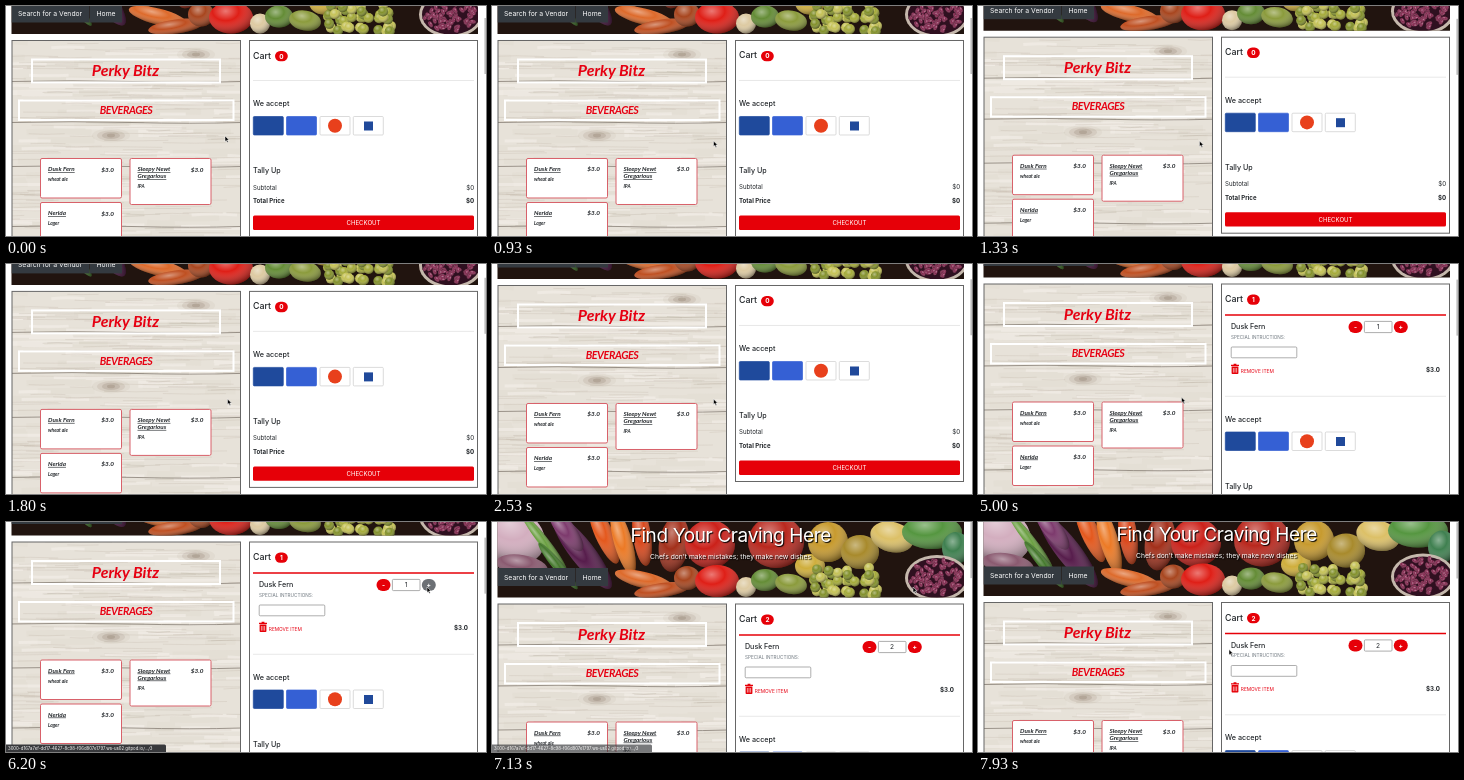
An HTML page for the animation above (8000 ms loop, 480 px wide and 230 px high).

```html
<!DOCTYPE html>
<html lang="en">
<head>
<meta charset="utf-8">
<title>Vendor menu and cart</title>
<style>
html, body { margin: 0; width: 100%; height: 100%; overflow: hidden; background: #fff; }
svg { display: block; width: 100vw; height: 100vh; }
text { font-family: Inter, Roboto, sans-serif; fill: #212529; white-space: pre; }
.medium { font-weight: 500; }
.bold { font-weight: 700; }
.middle { text-anchor: middle; }
.end { text-anchor: end; }
.white { fill: #fff; }
.red { fill: #e60012; }
.grey { fill: #6c757d; }
.script { font-family: Lato, sans-serif; font-weight: 700; font-style: italic; }
.title { letter-spacing: -.04em; }
.heading { letter-spacing: -.02em; }
.under { text-decoration: underline; }
.shadow { text-shadow: 1px 1px 1px #000; }
</style>
</head>
<body>
<svg id="stage" viewBox="0 0 480 230"></svg>
<script>
const LOOP = 8000, RED = '#e60008', ITEM_HEIGHT = 72;
const $ = id => document.getElementById(id);

let seed = 11;
const random = (lo = 0, hi = 1) => {
  seed = (seed * 16807) % 2147483647;
  return lo + (hi - lo) * seed / 2147483647;
};
const repeat = (n, make) => Array.from({ length: n }, (_, i) => make(i)).join('');

const text = (x, y, size, words, cls = '', id = '') =>
  `<text x="${x}" y="${y}" font-size="${size}" class="${cls}" id="${id}">${words}</text>`;
const rect = (x, y, w, h, attrs) =>
  `<rect x="${x}" y="${y}" width="${w}" height="${h}" ${attrs}/>`;
const ellipse = (x, y, rx, ry, fill, angle = 0) =>
  `<ellipse cx="${x}" cy="${y}" rx="${rx}" ry="${ry}" fill="${fill}" transform="rotate(${angle} ${x} ${y})"/>`;
const line = (x, y, w, colour, weight) =>
  `<path d="M${x} ${y}h${w}" stroke="${colour}" stroke-width="${weight}"/>`;
const ball = (x, y, rx, ry, fill, angle) =>
  ellipse(x, y, rx, ry, fill, angle) + ellipse(x, y, rx, ry, 'url(#shade)', angle);

function banner() {
  const food = [
    [20, 14, 34, 27, '#d3aebf', 25], [30, 44, 26, 11, '#8a5a70', 10], [52, 20, 5, 36, '#6ba042', -38],
    [66, 44, 5, 30, '#44782c', -40], [90, 30, 12, 46, '#571d4c', -38], [74, 8, 9, 26, '#7d3a6d', -38],
    [112, 12, 9, 32, '#e4581d', -24], [131, 20, 9, 34, '#ec7a26', -16], [150, 14, 9, 30, '#d9471b', -8],
    [182, 22, 15, 28, '#a3301b', 8], [152, 58, 30, 8, '#dd6a2b', 14], [170, 68, 28, 7, '#bf5022', -8],
    [195, 56, 13, 12, '#a8461f', 0], [218, 22, 25, 24, '#cb211a', 0], [225, 59, 22, 16, '#df1f17', 0],
    [284, 20, 28, 26, '#b9281e', 0], [254, 65, 10, 10, '#ddcaa2', 0], [273, 58, 14, 11, '#648c36', 0],
    [299, 62, 16, 10, '#8b9b3c', 10], [318, 44, 15, 12, '#cfae3c', 0], [336, 20, 20, 20, '#c79a2e', 0],
    [368, 30, 19, 17, '#a88a2c', 0], [400, 15, 22, 15, '#dcc067', 15], [440, 10, 30, 17, '#559640', 0],
    [464, 26, 14, 16, '#3f8050', 0]
  ].map(f => ball(...f)).join('');
  const grapes = repeat(40, () =>
    ball(random(322, 385), random(46, 73), 5, 5, ['#a5ab3a', '#c5c257', '#83912c'][Math.floor(random(0, 3))]));
  const beans = repeat(75, () => {
    const a = random(0, 6.28), r = Math.sqrt(random());
    return ball(445 + 26 * r * Math.cos(a), 56 + 18 * r * Math.sin(a), 3.2, 2, '#842a50', random(0, 180));
  });
  return `<g clip-path="url(#bannerClip)" transform="translate(0 -82)">
    ${rect(5, -20, 468, 97, 'fill="#21140f"')}${food}${grapes}
    ${ellipse(445, 56, 32, 23, '#c5b8ac')}${ellipse(445, 56, 29, 20, '#2f1020')}${beans}
    ${rect(5.5, 46, 78, 18, 'fill="#343a40"')}${rect(84, 46, 32, 18, 'fill="#343a40"')}
    ${text(12, 57.5, 6.8, 'Search for a Vendor', 'white')}${text(90.5, 57.5, 6.8, 'Home', 'white')}
    ${text(238.7, 20, 19, 'Find Your Craving Here', 'white middle shadow heading')}
    ${text(238.5, 37, 6.75, "Chefs don't make mistakes; they make new dishes", 'white middle shadow')}
  </g>`;
}

function wood() {
  const grain = (n, colour, weight) => {
    const d = repeat(n, () => {
      const w = random(20, 100), bend = random(-2, 2);
      return `M${random(-30, 225)} ${random(0, 255)}q${w / 2} ${bend} ${w} 0`;
    });
    return `<path d="${d}" fill="none" stroke="${colour}" stroke-width="${weight}"/>`;
  };
  const seams = [41, 82, 126, 186, 229].map(y =>
    `<path d="M6 ${y}q60 -1.5 120 0t110 0" fill="none" stroke="#6d645a" stroke-width=".9" opacity=".7"/>`).join('');
  const knot = (x, y) => repeat(4, i =>
    `<ellipse cx="${x}" cy="${y}" rx="${19 - i * 5}" ry="${7 - i * 1.7}" fill="#8c7b69" opacity="${.07 + i * .08}"/>`);
  return `<g clip-path="url(#woodClip)">${rect(6, 0, 228, 260, 'fill="#e7e2d9"')}
    ${grain(70, '#d9d1c540', 6)}${grain(90, '#f7f4ee70', 3)}${grain(150, '#b5a99a50', .7)}${grain(45, '#8b7e7050', .5)}
    ${seams}${knot(105, 95)}${knot(190, 14)}${knot(62, 196)}</g>`;
}

function menuCard(x, y, h, names, note, id) {
  return `<g id="${id}" transform="translate(${x} ${y})">
    ${rect(.5, .5, 81, h, `id="${id}Box" fill="#fff" stroke="#d8616a" stroke-width="1" rx="1.5"`)}
    <g id="${id}Text">
      ${names.map((name, i) => text(8, 13 + i * 7, 6.3, name, 'script under')).join('')}
      ${text(8, 16 + names.length * 7, 4.8, note, 'script')}
    </g>
    ${text(74, 13.5, 6.4, '$3.0', 'script end', id + 'Price')}
  </g>`;
}

function menu() {
  const frame = (x, y, w, h) => rect(x, y, w, h, 'fill="none" stroke="#fff" stroke-width="2"');
  return wood() + rect(6, 0, 228.5, 260, 'fill="none" stroke="#666"')
    + frame(26, 19, 188, 23) + text(119.5, 35.5, 15.9, 'Perky Bitz', 'script red middle')
    + frame(13, 60, 214.5, 19.5) + text(120, 73.3, 10.7, 'BEVERAGES', 'script red middle title')
    + menuCard(34, 117.5, 39.5, ['Dusk Fern'], 'wheat ale', 'first')
    + menuCard(123.5, 117.5, 46, ['Sleepy Newt', 'Gregarious'], 'IPA', 'second')
    + menuCard(34, 161.5, 39.5, ['Nerida'], 'Lager', 'third');
}

function cartItem() {
  const button = (x, sign, id) => rect(x - 7, 37, 14, 12, `rx="6" fill="${RED}" id="${id}"`)
    + text(x, 45.4, 6.6, sign, 'white bold middle');
  const trash = `<path d="M253 81.3h8M255.6 80.4h2.8" stroke="${RED}" stroke-width="1.3"/>
    <path d="M253.6 82.6h6.8v6.6q0 .8-.8.8h-5.2q-.8 0-.8-.8z" fill="${RED}"/>
    <path d="M255.4 84v4.6m1.6-4.6v4.6m1.6-4.6v4.6" stroke="#fff" stroke-width=".6"/>`;
  const field = 'fill="#fff" stroke="#8c8c8c" stroke-width=".7" rx="1"';
  return `<g id="item">
    ${line(247, 31, 221, RED, 1.5)}
    ${text(253, 45, 7.1, 'Dusk Fern', 'medium')}
    ${text(253, 54.7, 4.7, 'SPECIAL INTRUCTIONS:', 'grey')}
    ${rect(253.2, 63, 65.6, 10.8, field)}
    ${trash}${text(262.8, 88.7, 4.8, 'REMOVE ITEM', 'red')}
    ${text(462, 88, 6.2, '$3.0', 'bold end')}
    ${button(377.5, '-', 'minus')}${rect(386.4, 37.4, 27.6, 11.2, field)}
    ${text(400, 45.4, 6.6, '1', 'middle', 'quantity')}${button(422.8, '+', 'plus')}
    ${line(247, 112.3, 221, '#e2e2e2', .8)}
  </g>`;
}

function cart() {
  const plate = (x, fill, stroke) => rect(x, 76, 30, 18.5, `rx="1" fill="${fill}" stroke="${stroke}" stroke-width=".7"`);
  return rect(243.5, 0, 228, 196, 'id="cartBox" fill="#fff" stroke="#666"')
    + text(247, 18, 8.8, 'Cart', 'medium')
    + rect(269, 10.4, 12.8, 10.4, `rx="5.2" fill="${RED}"`)
    + text(275.4, 18, 6.4, '0', 'white bold middle', 'badge')
    + `<g id="emptyRule">${line(247, 40, 221, '#e2e2e2', .8)}</g>`
    + cartItem()
    + `<g id="summary">
      ${text(247, 65.5, 7.2, 'We accept', 'medium')}
      ${plate(247.3, '#1f4a9c', '#1f4a9c')}${plate(280.5, '#3560d4', '#3560d4')}
      ${plate(314, '#fff', '#ccc')}${ellipse(329, 85.2, 7, 7, '#e8401c')}
      ${plate(347.3, '#fff', '#ccc')}${rect(358, 81, 9, 9, 'fill="#20499a"')}
      ${text(247, 132.7, 7.2, 'Tally Up', 'medium')}
      ${text(247, 149, 6.1, 'Subtotal')}${text(468, 149, 6.1, '$0', 'end', 'subtotal')}
      ${text(247, 162.4, 6.1, 'Total Price', 'bold')}${text(468, 162.4, 6.1, '$0', 'bold end', 'total')}
      ${rect(247, 175, 221, 14.4, `rx="1.5" fill="${RED}"`)}
      ${text(357.5, 184.6, 6.1, 'CHECKOUT', 'white middle')}
    </g>`;
}

$('stage').innerHTML = `<defs>
    <radialGradient id="shade" cx=".38" cy=".3" r=".75">
      <stop offset="0" stop-color="#fff" stop-opacity=".4"/>
      <stop offset=".4" stop-color="#fff" stop-opacity="0"/>
      <stop offset="1" stop-color="#000" stop-opacity=".5"/>
    </radialGradient>
    <clipPath id="bannerClip">${rect(5.5, -20, 466.5, 95.5, '')}</clipPath>
    <clipPath id="woodClip">${rect(6, 0, 228, 260, '')}</clipPath>
  </defs>
  <g id="page">${banner()}${menu()}${cart()}</g>
  ${rect(478.4, 0, 1.6, 56, 'id="thumb" fill="#bdbdbd"')}
  <g id="status">${rect(-2, 222.5, 162, 10, 'rx="1.5" fill="#38393c"')}
    ${text(2, 228.2, 4.3, '3000-d167a7ef-dd17-4627-8c98-f06d807e1797.ws-us02.gitpod.io/.../3', 'white')}</g>
  <path id="cursor" d="M0 0v5.6l1.3-1.2 1 2.2 1-.5-1-2.1h1.8z" fill="#000" stroke="#fff" stroke-width=".5"/>`;

// Keys are [time, value, ...]; smooth interpolation is optional.
function sample(keys, t, smooth = false) {
  const next = keys.findIndex(k => k[0] > t);
  if (next === 0) return keys[0].slice(1);
  if (next < 0) return keys[keys.length - 1].slice(1);
  const a = keys[next - 1], b = keys[next];
  let u = (t - a[0]) / (b[0] - a[0]);
  if (smooth) u = u * u * (3 - 2 * u);
  return a.slice(1).map((v, i) => v + (b[i + 1] - v) * u);
}

const scrollKeys = [[930, 34.5], [1330, 31.2], [2530, 21.5], [3000, 20], [6480, 20], [6900, 82], [7270, 82], [7900, 80.5]];
const cursorKeys = [[70, 219, 130], [870, 221.5, 135], [3500, 221.5, 135], [3780, 99, 159], [4670, 99, 159],
  [5470, 380, 90], [6100, 421, 65], [7270, 421, 65], [7850, 251, 127.5]];
const statusKeys = [[5950, 0], [6000, 1], [7050, 1], [7300, 0]];

const move = (id, x, y) => $(id).setAttribute('transform', `translate(${x} ${y})`);
const show = (id, on) => $(id).setAttribute('visibility', on ? 'visible' : 'hidden');

function draw(t) {
  const [top] = sample(scrollKeys, t);
  const hover = t >= 3720 && t < 4800;
  const count = t < 4270 ? 0 : t < 6500 ? 1 : 2;
  const shift = count ? ITEM_HEIGHT : 0;

  move('page', 0, top);
  $('thumb').setAttribute('y', 12 + (34.5 - top) * .25);

  const box = $('firstBox');
  box.setAttribute('stroke', hover ? RED : '#d8616a');
  box.setAttribute('stroke-width', hover ? 2 : 1);
  box.setAttribute('height', hover ? 41.5 : 39.5);
  move('firstText', hover ? 1 : 0, hover ? 1 : 0);
  move('firstPrice', hover ? -1 : 0, hover ? 1 : 0);
  move('third', 34, hover ? 164 : 161.5);

  show('item', count);
  show('emptyRule', !count);
  move('summary', 0, shift);
  $('cartBox').setAttribute('height', 196 + shift);
  $('badge').textContent = count;
  $('quantity').textContent = Math.max(1, count);
  $('subtotal').textContent = $('total').textContent = count ? `$${count * 3}.0` : '$0';
  $('plus').setAttribute('fill', t >= 5950 && t < 6500 ? '#6c7075' : RED);

  $('status').setAttribute('opacity', sample(statusKeys, t)[0]);
  move('cursor', ...sample(cursorKeys, t, true));
}

const start = performance.now();
function tick() {
  draw((performance.now() - start) % LOOP);
  requestAnimationFrame(tick);
}
tick();
</script>
</body>
</html>
```
